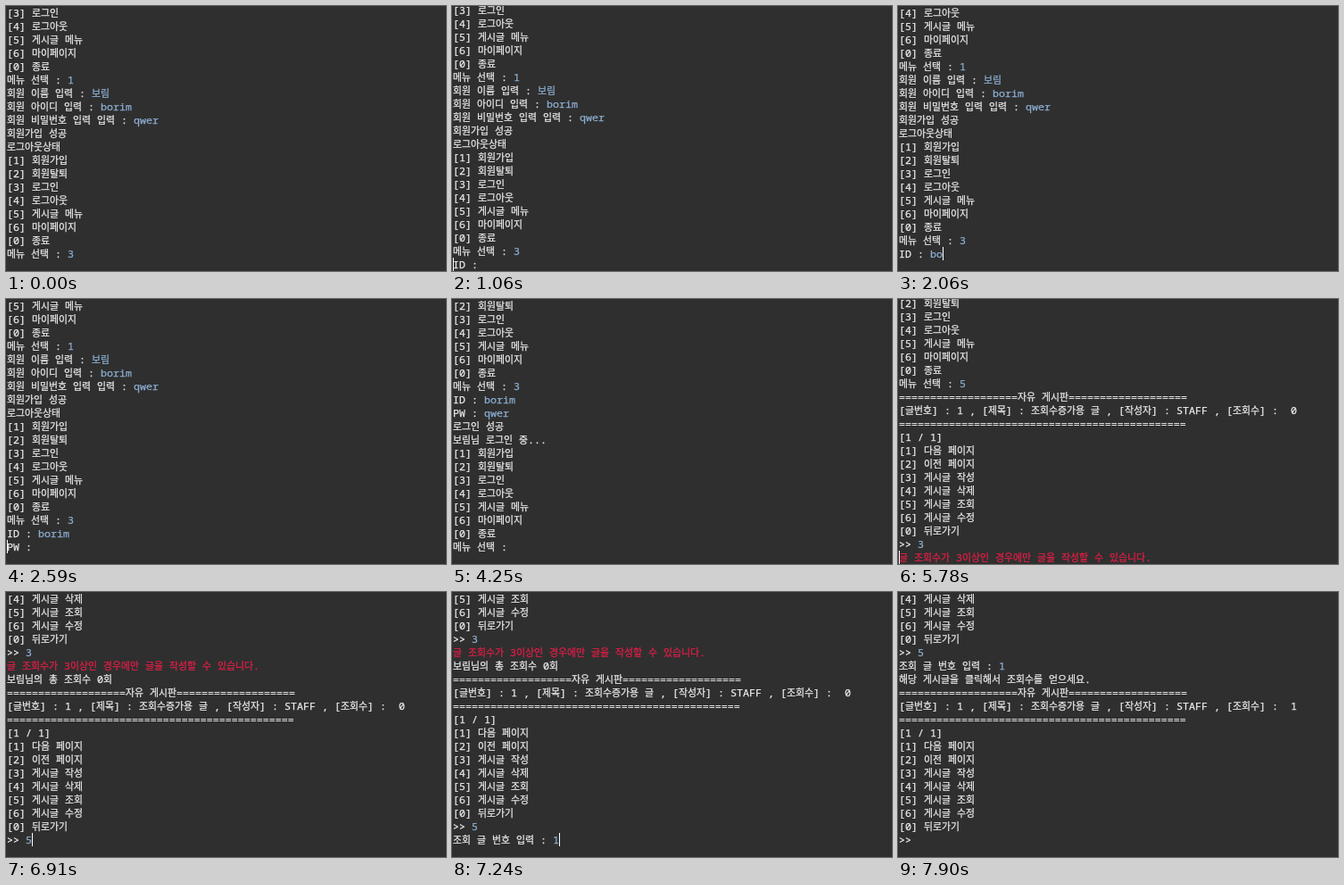
These frames come from a looping animation (493 by 297 pixels, 8000 ms). An HTML page:

```html
<!DOCTYPE html>
<html lang="ko">
<head>
<meta charset="utf-8">
<title>Console session</title>
<style>
  html, body { margin: 0; width: 100%; height: 100%; overflow: hidden; background: #2f2f2f; }
  svg { display: block; }
  text { fill: currentColor; stroke: currentColor; stroke-width: .25px; }
  .latin { font: 11.667px "Noto Sans Mono", "DejaVu Sans Mono", monospace; }
  .hangul { font: 10.87px "Noto Sans CJK KR", "Noto Sans CJK", "Noto Sans KR", sans-serif; }
  .out { color: #ebebeb; }
  .in { color: #8cafd2; }
  .err { color: #e11e46; }
</style>
</head>
<body>
<svg width="493" height="297" viewBox="0 0 493 297">
  <g id="screen"></g>
  <rect id="caret" width="1" height="15" fill="#fff"/>
</svg>
<script>
const LOOP = 8000, BLINK = 530;
const LEFT = 1, ROW = 15, BASELINE = 12, HEIGHT = 297, PAGE = 19;
const screen = document.getElementById('screen');
const caret = document.getElementById('caret');

// Console log: each line has its text, the input typed after it and a colour class
const line = (text, input = '', kind = 'out') => ({ text, input, kind });
const list = (labels) => labels.map((s, i) => line(`[${(i + 1) % labels.length}] ${s}`));

const mainMenu = list(['회원가입', '회원탈퇴', '로그인', '로그아웃', '게시글 메뉴', '마이페이지', '종료']);
const boardMenu = list(['다음 페이지', '이전 페이지', '게시글 작성', '게시글 삭제',
  '게시글 조회', '게시글 수정', '뒤로가기']);
const bar = '='.repeat(19);
const board = (views) => [
  line(`${bar}자유 게시판${bar}`),
  line(`[글번호] : 1 , [제목] : 조회수증가용 글 , [작성자] : STAFF , [조회수] :  ${views}`),
  line('='.repeat(46)),
  line('[1 / 1]'),
  ...boardMenu
];

const history = [
  ...mainMenu.slice(2),
  line('메뉴 선택 : ', '1'),
  line('회원 이름 입력 : ', '보림'),
  line('회원 아이디 입력 : ', 'borim'),
  line('회원 비밀번호 입력 입력 : ', 'qwer'),
  line('회원가입 성공'),
  line('로그아웃상태'),
  ...mainMenu
];
const log = [
  ...history,
  line('메뉴 선택 : ', '3'),
  line('ID : ', 'borim'),
  line('PW : ', 'qwer'),
  line('로그인 성공'),
  line('보림님 로그인 중...'),
  ...mainMenu,
  line('메뉴 선택 : ', '5'),
  ...board(0),
  line('>> ', '3'),
  line('글 조회수가 3이상인 경우에만 글을 작성할 수 있습니다.', '', 'err'),
  line('보림님의 총 조회수 0회'),
  ...board(0),
  line('>> ', '5'),
  line('조회 글 번호 입력 : ', '1'),
  line('해당 게시글을 클릭해서 조회수를 얻으세요.'),
  ...board(1),
  line('>> ')
];

// Lines that wait for input end in a space; each one is answered by one turn
const prompts = [...log.keys()].filter((i) => i >= history.length && log[i].text.endsWith(' '));
const turn = (type, enter, gap = 100, delay = 60) => ({ type, enter, gap, delay });
const turns = [
  turn(0, 1060),
  turn(1860, 2530, 110),
  turn(3190, 3660, 46),
  turn(4780, 4980, 100, 140),
  turn(5650, 5780),
  turn(6910, 7040),
  turn(7200, 7305),
  turn(LOOP, LOOP)
];
// Before the first answer the caret is parked behind a menu entry
const PARKED = 15, PARKED_AT = 140;

function stateAt(t) {
  const k = turns.findIndex((s) => t < s.enter);
  const { type, gap } = turns[k];
  const first = k === 0;
  const reply = first ? PARKED : prompts[k - 1] + 1;
  const settled = first ? PARKED_AT : turns[k - 1].enter + turns[k - 1].delay;

  // A new line first touches the bottom edge, then the view snaps to whole rows
  if (!first && t < settled) {
    return { last: reply, typed: 0, scroll: (reply + 1) * ROW - HEIGHT, at: reply, atEnd: false, on: true };
  }
  const last = prompts[k];
  const typed = t < type ? 0 : Math.floor((t - type) / gap) + 1;
  const typing = !first && typed > 0;
  return {
    last, typed,
    scroll: (last + 1 - PAGE) * ROW,
    at: typing ? last : reply,
    atEnd: typing || first,
    on: typing || Math.floor((t - settled) / BLINK) % 2 === 0
  };
}

const isHangul = (c) => c >= '가' && c <= '힣';
const width = (s) => [...s].reduce((sum, c) => sum + (isHangul(c) ? 10 : 7), 0);

function write(text, x, y, kind) {
  for (const m of text.matchAll(/[가-힣]+|[^가-힣 ]+/g)) {
    const el = document.createElementNS('http://www.w3.org/2000/svg', 'text');
    el.setAttribute('x', x + width(text.slice(0, m.index)));
    el.setAttribute('y', y + BASELINE);
    el.setAttribute('class', `${kind} ${isHangul(m[0][0]) ? 'hangul' : 'latin'}`);
    el.textContent = m[0];
    screen.append(el);
  }
}

function draw({ last, typed, scroll, at, atEnd, on }) {
  const input = (i) => i === last ? log[i].input.slice(0, typed) : log[i].input;

  screen.replaceChildren();
  for (let i = Math.floor(scroll / ROW); i <= last; i++) {
    const { text, kind } = log[i];
    const y = i * ROW - scroll;
    write(text, LEFT, y, kind);
    write(input(i), LEFT + width(text), y, 'in');
  }

  caret.style.display = on ? '' : 'none';
  caret.setAttribute('x', LEFT + (atEnd ? width(log[at].text + input(at)) : 0));
  caret.setAttribute('y', at * ROW - scroll);
}

let drawn;
const start = performance.now();

function tick() {
  const state = stateAt((performance.now() - start) % LOOP);
  const key = Object.values(state).join();
  if (key !== drawn) draw(state);
  drawn = key;
  requestAnimationFrame(tick);
}
tick();
</script>
</body>
</html>
```
